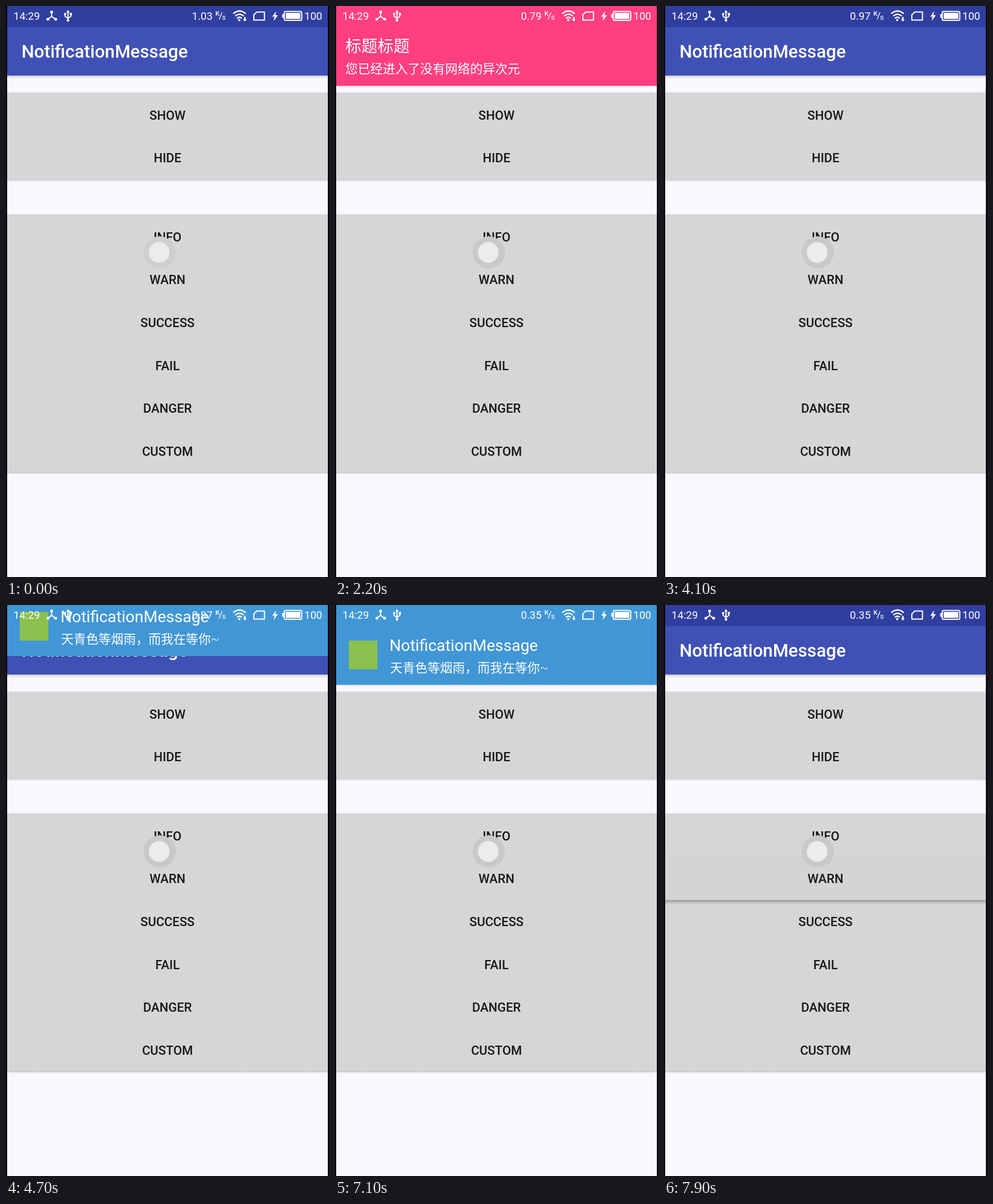
These frames come from a looping animation (563x994 px, 8 s). An HTML page:

```html
<!DOCTYPE html>
<html lang="zh-CN">
<head>
<meta charset="utf-8">
<title>Notification banner</title>
<style>
  html, body { margin: 0; width: 100%; height: 100%; overflow: hidden; background: #000; }
  svg { display: block; width: 100%; height: 100%; }
  text { font-family: Roboto, "Noto Sans CJK SC", "Noto Sans CJK", sans-serif; }
  #labels { font-size: 21.8px; font-weight: 500; fill: #17171a; text-anchor: middle; }
  #banner { fill: #fff; }
  .head { font-size: 28px; }
  .body { font-size: 21.75px; }
  .light { font-weight: 300; }
  #status { font-size: 18.5px; fill: #fff; }
  .line { fill: none; stroke: #fff; stroke-width: 2; }
</style>
</head>
<body>
<svg viewBox="0 0 563 994">
  <defs>
    <linearGradient id="shade" x2="0" y2="1">
      <stop stop-color="#000" stop-opacity=".36"/>
      <stop offset=".4" stop-color="#000" stop-opacity=".14"/>
      <stop offset="1" stop-color="#000" stop-opacity="0"/>
    </linearGradient>
    <clipPath id="screen"><rect x="2" width="559" height="994"/></clipPath>
  </defs>
  <g clip-path="url(#screen)">
    <rect width="563" height="994" fill="#faf8fc"/>

    <rect y="121" width="563" height="6" fill="url(#shade)" opacity=".6"/>
    <rect width="563" height="121" fill="#3f51b5"/>
    <rect width="563" height="37" fill="#303f9f"/>
    <text x="27" y="90" font-size="31.1" font-weight="500" fill="#fff">NotificationMessage</text>

    <g id="panels"></g>
    <g id="raised">
      <rect y="-1" width="563" height="1" opacity=".1"/>
      <rect y="76" width="563" height="8" fill="url(#shade)"/>
      <rect width="563" height="76" fill="#d4d3d6"/>
    </g>
    <g id="labels"></g>

    <g id="banner">
      <rect y="139" width="563" height="4" fill="url(#shade)" opacity=".3"/>
      <rect id="fill" width="563" height="139"/>
      <g id="plain" class="light">
        <text class="head" x="18" y="80">标题标题</text>
        <text class="body" x="18" y="117">您已经进入了没有网络的异次元</text>
      </g>
      <g id="info">
        <rect x="24" y="62" width="50" height="50" fill="#8bc04f"/>
        <text class="head" x="95" y="80">NotificationMessage</text>
        <text class="body light" x="96" y="117">天青色等烟雨，而我在等你~</text>
      </g>
    </g>

    <g id="touch">
      <circle id="ring" cx="268" cy="429" r="28"/>
      <circle cx="267" cy="429" r="18" fill="#ecebed"/>
    </g>

    <g id="status">
      <text x="13" y="24">14:29</text>
      <path class="line" d="M79.5 10V18L73 23M79.5 18L86 23"/>
      <circle cx="79.5" cy="10.5" r="2.5"/>
      <circle cx="73" cy="23" r="2.5"/>
      <circle cx="86.500" cy="23" r="2.5"/>
      <path class="line" stroke-width="1.6" d="M108 10V25M103 14V18L108 21.500L113 18V14"/>
      <path d="M108 7l3 4.500h-6zM111 12h4v4h-4z"/>
      <circle cx="103" cy="14" r="2"/>
      <circle cx="108" cy="25" r="2.3"/>
      <text id="speed" x="324" y="24"></text>
      <text x="365" y="17" font-size="11.500" font-weight="500">K</text>
      <path class="line" style="stroke-width:1.3" d="M371.500 23.500L376.500 11"/>
      <text x="376.500" y="24" font-size="13">s</text>
      <path class="line" style="stroke-width:2.2" d="M396 13.500Q407 4 418 13.500M399.500 17.500Q407 11 414.500 17.500M402.500 21.500Q407 17.500 411 21.500"/>
      <circle cx="406.500" cy="24.500" r="2"/>
      <path d="M415 19h2.500v4h2l-3.200 4-3.300-4h2z"/>
      <path class="line" d="M437 10.500H450.500V24.500H432V15.500Z" stroke-linejoin="round"/>
      <path d="M471 9L464 18.500H468L466.500 26L474 16H469.500Z"/>
      <rect class="line" x="485" y="9.500" width="30.500" height="15.500" rx="2.500"/>
      <rect x="487.500" y="12" width="25.500" height="10.500"/>
      <rect x="481.500" y="14" width="3" height="6.500"/>
      <text x="520" y="24">100</text>
    </g>
  </g>
</svg>
<script>
const $ = id => document.getElementById(id);
const LOOP = 8000, STEP = 100, ROW = 74.6, BANNER_H = 145;

const panels = [
  { top: 151, height: 150.5, names: ['SHOW', 'HIDE'] },
  { top: 363, height: 448, names: ['INFO', 'WARN', 'SUCCESS', 'FAIL', 'DANGER', 'CUSTOM'] }
];
const rowTop = {};
for (const { top, height, names } of panels) {
  $('panels').innerHTML +=
    `<rect y="${top + height}" width="563" height="5" fill="url(#shade)" opacity=".75"/>
     <rect y="${top - 1}" width="563" height="1" opacity=".06"/>
     <rect y="${top}" width="563" height="${height}" fill="#d6d5d8"/>`;
  names.forEach((name, i) => {
    rowTop[name] = top + i * ROW;
    $('labels').innerHTML += `<text x="281.500" y="${rowTop[name] + 46.7}">${name}</text>`;
  });
}

const presses = [['SHOW', 1600], ['HIDE', 3300], ['INFO', 4400], ['WARN', 7900]];
const speeds = [[0, '1.03'], [1100, '0.79'], [4100, '0.97'], [7100, '0.35']];

// Eased 0..1 progress between two times
const ease = (t, from, to) => {
  const p = Math.min(1, Math.max(0, (t - from) / (to - from)));
  return (1 - Math.cos(Math.PI * p)) / 2;
};

function draw(now) {
  const t = Math.floor(now % LOOP / STEP) * STEP;
  const isInfo = t >= 4400;
  const shown = isInfo
    ? ease(t, 4400, 4900) - ease(t, 7400, 7900)
    : ease(t, 1600, 2200) - ease(t, 3300, 3900);

  $('banner').setAttribute('transform', `translate(0 ${(shown - 1) * BANNER_H})`);
  $('fill').setAttribute('fill', isInfo ? '#4196d6' : '#ff3f7e');
  $('plain').style.display = isInfo ? 'none' : '';
  $('info').style.display = isInfo ? '' : 'none';

  const press = presses.find(([, at]) => t >= at && t < at + 200);
  $('raised').style.opacity = press ? 1 - (t - press[1]) / 200 : 0;
  if (press) $('raised').setAttribute('transform', `translate(0 ${rowTop[press[0]]})`);

  $('ring').setAttribute('fill', t < 1100 ? '#cfced1' : '#c9c8cb');
  $('speed').textContent = speeds.findLast(([at]) => t >= at)[1];
}

const start = performance.now();
function tick() {
  draw(performance.now() - start);
  requestAnimationFrame(tick);
}
tick();
</script>
</body>
</html>
```
